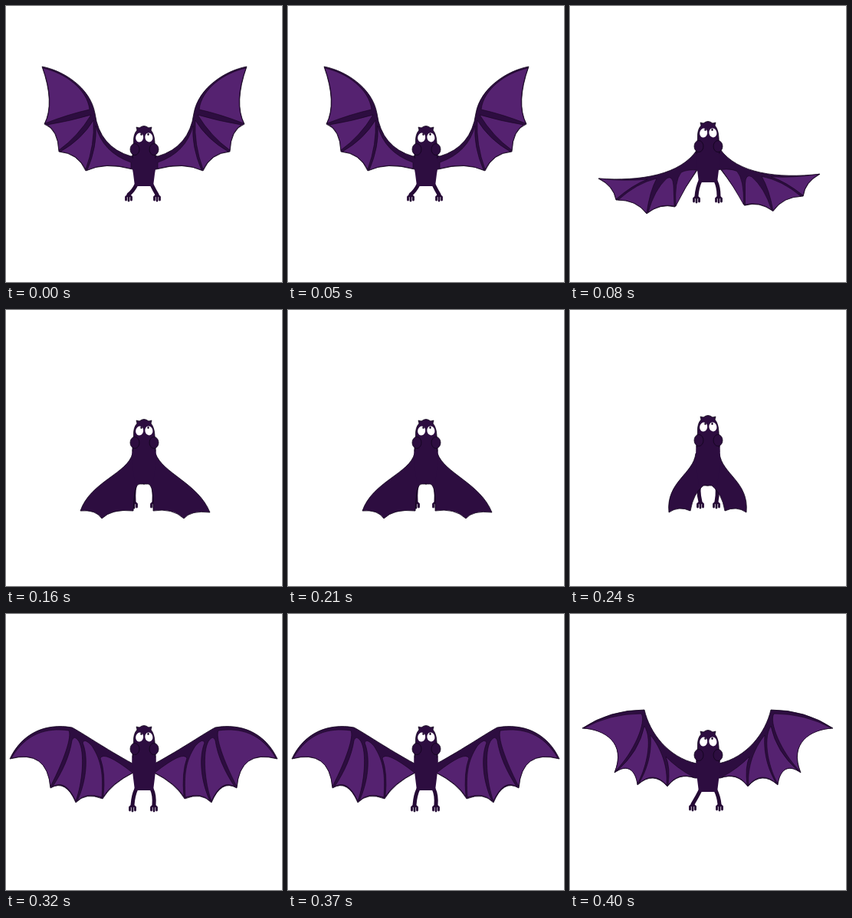
An HTML page for the animation above (480 ms loop, 360 by 360 pixels).

```html
<!DOCTYPE html>
<html lang="en">
<head>
<meta charset="utf-8">
<title>Flapping bat</title>
<style>
html, body { margin: 0; height: 100%; overflow: hidden; background: #fff; }
svg { display: block; width: 100vw; height: 100vh; }
.dark { fill: #2d0d40; stroke: #10041a; stroke-width: .8; stroke-linejoin: round; }
.skin { fill: #552270; stroke: #16061f; stroke-width: .6; stroke-linejoin: round; }
.limb { fill: none; stroke: #250a35; stroke-linecap: round; stroke-linejoin: round; }
</style>
</head>
<body>
<svg id="stage" viewBox="0 0 360 360"></svg>
<script>
const STEP = 80;

// Left wing in stage units; the right one is mirrored about x = axis.
// head: top of head, cheek: cheek offset below it, hip: end of trunk, foot: left ankle, right ankle, y
const poses = [
  { axis: 180.5, head: 156, cheek: 31, hip: 236, foot: [160, 197, 246],
    wing: 'M47 79C74 84 110 106 116 140Q122 184 163 196L181 192V213H165Q129 203 104 215Q94 192 69 190Q68 161 50 154Q64 127 47 79Z',
    skin: 'M48 81C76 87 106 108 109 135Q82 141 51 153Q64 125 48 81ZM54 155Q84 150 111 142Q94 170 69 188Q68 164 54 155ZM71 190Q99 174 114 149Q116 180 104 213Q93 192 71 190ZM106 214Q119 183 117 156Q126 191 163 204V212Q130 203 106 214Z' },
  { axis: 181.5, head: 150, cheek: 33, hip: 231, foot: [165, 194, 248], tilt: -2.3,
    wing: 'M37 225C92 229 145 220 166 187L181 184V214H166Q150 236 137 262Q117 257 100 271Q86 252 60 253Q57 235 37 225Z',
    skin: 'M38 225Q72 229 101 226Q82 233 60 252Q57 235 38 225ZM63 253Q87 231 113 225Q104 242 100 270Q86 253 63 253ZM102 269Q110 240 126 225Q134 220 135 234L136 261Q118 257 102 269ZM138 261Q136 228 145 217Q153 213 165 214Q150 236 138 261Z' },
  { axis: 179.5, head: 142, cheek: 31, hip: 227, foot: [167, 193, 250],
    wing: 'M97 262C110 224 159 213 165 187L181 180V227H174Q168 228 167 246L166 262Q138 259 125 272Q117 260 97 262Z',
    right: 'M93 264C108 226 155 213 164 187L180 180V227H173Q168 229 167 246L167 262Q142 258 127 272Q118 261 93 264Z' },
  { axis: 179.5, head: 137, cheek: 33, hip: 229, foot: [170, 191, 250],
    wing: 'M129 264C125 224 161 214 164 187L181 180V229H174Q161 239 157 262Q142 255 129 264Z' },
  { axis: 179.5, head: 145, cheek: 31, hip: 231, foot: [165, 193, 249],
    wing: 'M5 189C21 155 52 142 86 148C98 154 130 176 165 195L181 190V209L166 207Q138 221 126 241Q104 232 91 246Q78 215 58 227Q54 176 5 189Z',
    skin: 'M7 188C26 156 52 148 82 152C86 160 76 190 58 225Q53 177 7 188ZM61 225C74 205 83 185 86 165Q89 157 95 166C103 180 100 220 91 244Q78 215 61 225ZM93 244C106 215 107 185 100 168Q102 161 112 172C125 192 127 210 125 239Q104 232 93 244ZM127 238Q130 207 123 188Q128 178 165 207Q138 221 127 238Z' },
  { axis: 179.5, head: 151, cheek: 33, hip: 233, foot: [160, 195, 248],
    wing: 'M16 149Q52 125 97 125C104 155 128 187 165 195L181 190V214H163Q141 206 127 225Q109 204 88 223C86 205 76 194 58 207C74 168 45 150 16 149Z',
    skin: 'M18 149Q52 130 93 130C100 140 84 180 59 205C73 168 45 151 18 149ZM61 205Q90 180 97 146C109 165 98 205 88 221C85 205 76 195 61 205ZM90 221C99 205 107 185 105 158C119 175 128 200 126 223Q109 204 90 221ZM128 223Q131 200 125 186Q138 200 161 213Q141 206 128 223Z' }
];

const path = (cls, d) => `<path class="${cls}" d="${d}"/>`;
const oval = (x, y, rx, ry, attrs) =>
  `<ellipse cx="${x}" cy="${y}" rx="${rx}" ry="${ry}" ${attrs}/>`;

function leg(side, hip, x, y) {
  return `<path class="limb" stroke-width="5" d="M${180 + side * 10} ${hip - 3}Q${180 + side * 14} ${hip + 5} ${x} ${y}"/>
    <path class="limb" stroke-width="2.8" d="M${x} ${y}l-3.5 3v4M${x} ${y}v8M${x} ${y}l3.5 3v4"/>`;
}

function draw(p) {
  const shapes = d => path('dark', d) + (p.skin ? path('skin', p.skin) : '');
  const flip = `rotate(${p.tilt || 0} 181 222) translate(${2 * p.axis} 0) scale(-1 1)`;
  const [left, right, y] = p.foot;
  const neck = p.head + 36;
  const waist = p.hip - 17;
  const cheekY = p.head + p.cheek;
  const eyeY = p.head + 15.5;
  return leg(-1, p.hip, left, y) + leg(1, p.hip, right, y) +
    shapes(p.wing) +
    `<g transform="${flip}">${shapes(p.right || p.wing)}</g>` +
    `<path fill="#2d0d40" d="M165 ${neck}H195Q197 ${neck + 12} 194 ${waist}L192 ${p.hip - 1}H168L166 ${waist}Q163 ${neck + 12} 165 ${neck}Z"/>` +
    `<g transform="translate(180 ${p.head})">${path('dark', 'M-13.5 22Q-14 11 -9 6L-10 2L-6 3Q0 -2 6 3L10 2L9 6Q13.5 11 14 22L15 42Q0 46 -15 42Z')}</g>` +
    `<path fill="#2d0d40" d="M166 ${neck - 4}H194V${neck + 14}H166Z"/>` +
    oval(168, cheekY, 6, 7.5, 'class="dark"') +
    oval(193, cheekY, 6, 7.5, 'class="dark"') +
    oval(174.2, eyeY, 5, 6, `fill="#fff" transform="rotate(12 174 ${eyeY})"`) +
    oval(186.4, eyeY, 5, 6, `fill="#fff" transform="rotate(-12 186 ${eyeY})"`) +
    oval(176.5, eyeY - 4, 1.2, 1.4, 'fill="#1a0626"') +
    oval(185.5, eyeY - 4, 1.2, 1.4, 'fill="#1a0626"');
}

const stage = document.getElementById('stage');
let shown = -1;

function tick() {
  const i = Math.floor(performance.now() / STEP) % poses.length;
  if (i !== shown) stage.innerHTML = draw(poses[shown = i]);
  requestAnimationFrame(tick);
}
tick();
</script>
</body>
</html>
```
